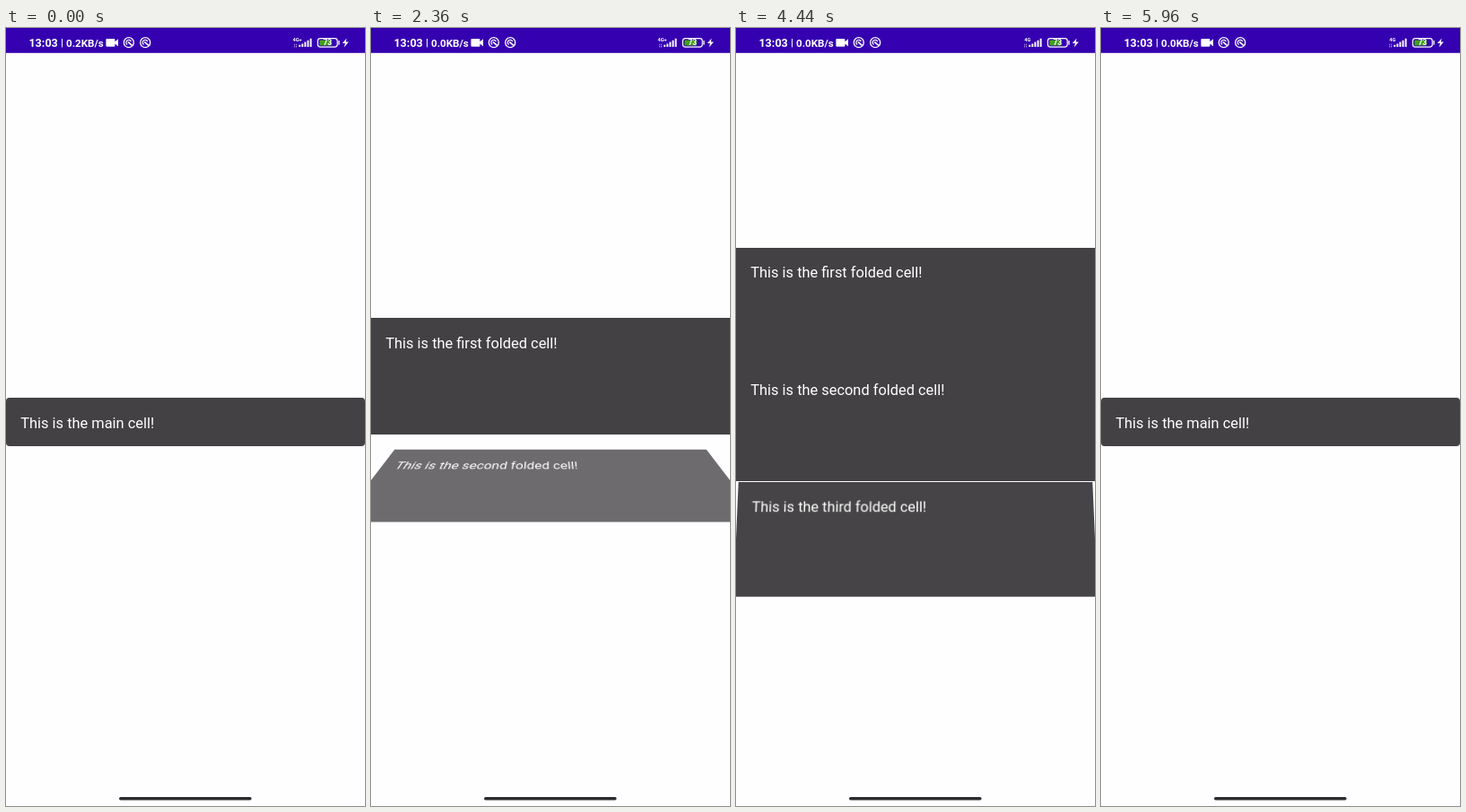
An HTML page that plays this animation: 400x867 px, repeating every 6 s.

```html
<!DOCTYPE html>
<html lang="en">
<head>
<meta charset="utf-8">
<title>Folding cells</title>
<style>
html, body { margin: 0; width: 100%; height: 100%; overflow: hidden; background: #fefdff; }
#stage { position: absolute; left: 0; top: 0; width: 400px; height: 867px; overflow: hidden; background: #fefdff; }
.cell {
  position: absolute; left: 0; width: 400px; overflow: hidden; box-sizing: border-box;
  padding: 17.8px 16.3px 0; background: #434143; color: #fff; white-space: nowrap;
  font: 16.4px/21.7px Roboto, sans-serif;
}
#main { border-radius: 4px; }
svg { position: absolute; left: 0; top: 0; }
svg text { font-family: Roboto, sans-serif; fill: #fff; }
</style>
</head>
<body>
<div id="stage">
  <div class="cell" id="main">This is the main cell!</div>
  <div class="cell fold">This is the first folded cell!</div>
  <div class="cell fold">This is the second folded cell!</div>
  <div class="cell fold">This is the third folded cell!</div>
  <svg width="400" height="867" viewBox="0 0 400 867">
    <defs>
      <g id="ring" fill="none" stroke="#fff">
        <circle r="5.5" stroke-width="1.3"/>
        <path d="M-1.6 2.4A2.9 2.9 0 1 1 2.6 -1.2" stroke-width="1.2"/>
        <path d="M-1 -.8L3.6 3.2" stroke-width="1.7"/>
      </g>
    </defs>
    <rect width="400" height="27.8" fill="#3500b0"/>
    <text x="25.4" y="20.8" font-size="12.6" font-weight="700">13:03</text>
    <text x="61" y="20.2" font-size="11.7" font-weight="500">|</text>
    <text id="speed" x="67" y="20.6" font-size="11.6" font-weight="700"></text>
    <path d="M112.4 12H120.4Q121.4 12 121.4 13V15.2L125 12.3V20.5L121.4 17.6V19.8Q121.4 20.8 120.4 20.8H112.4Q111.4 20.8 111.4 19.8V13Q111.4 12 112.4 12Z" fill="#fff"/>
    <use href="#ring" x="136.8" y="16.2"/>
    <use href="#ring" x="155.2" y="16.2"/>
    <text id="net" y="14.8" font-size="5.6" font-weight="700"></text>
    <path d="M321.6 21.5V17.8M323.6 17.8V21.5" stroke="#fff" stroke-width=".8" stroke-dasharray="1.5 .7" opacity=".75"/>
    <path d="M327.2 21V18.8M330.3 21V17.4M333.4 21V15.6M336.5 21V13.8M339.6 21V11.8" stroke="#fff" stroke-width="1.9"/>
    <rect x="347.4" y="11.7" width="21.8" height="9.4" rx="2.8" fill="none" stroke="#fff" stroke-width="1.2"/>
    <rect x="349.2" y="13.4" width="13.6" height="6" rx="1.2" fill="#43a01c"/>
    <path d="M371 14.6V18.2" stroke="#fff" stroke-width="1.3" stroke-linecap="round"/>
    <text x="358.3" y="19.4" font-size="8.4" font-weight="700" text-anchor="middle">73</text>
    <path d="M379.6 11.4L374.8 17H377.9L376.8 21.4L381.8 15.5H378.6Z" fill="#fff"/>
    <rect x="126" y="857" width="147.6" height="3.6" rx="1.8" fill="#2d2b2e"/>
  </svg>
</div>
<script>
const LOOP = 6000, FOLD_MS = 400;
const MID = 439.2, MAIN_H = 54.3, CELL_H = 130.4, PAD = 17.8, CAMERA = 213;
const OPEN = [1747, 2159, 2559];
const CLOSE = [5210, 4810, 4410];

const $ = id => document.getElementById(id);
const main = $('main'), speed = $('speed'), net = $('net');
const folds = [...document.querySelectorAll('.fold')];

// cubic-bezier(.4, 0, .2, 1)
function ease(x) {
  if (x <= 0) return 0;
  if (x >= 1) return 1;
  let lo = 0, hi = 1;
  for (let i = 0; i < 24; i++) {
    const s = (lo + hi) / 2, r = 1 - s;
    if (1.2 * r * r * s + .6 * r * s * s + s * s * s < x) lo = s; else hi = s;
  }
  return lo * lo * (3 - 2 * lo);
}

const openness = (t, i) => ease((t - OPEN[i]) / FOLD_MS) - ease((t - CLOSE[i]) / FOLD_MS);

function place(el, top, height, alpha) {
  el.style.top = top + 'px';
  el.style.height = height + 'px';
  el.style.opacity = alpha;
  el.style.visibility = alpha > .001 ? 'visible' : 'hidden';
}

function draw(t) {
  const open = folds.map((_, i) => openness(t, i));
  const total = Math.max(MAIN_H, CELL_H * open.reduce((a, b) => a + b));
  let y = MID - total / 2;

  place(main, y, total, 1 - open[0]);
  folds.forEach((el, i) => {
    const p = open[i], h = CELL_H * p;
    place(el, y, h, p);
    // Padding must not hold a short cell open.
    el.style.paddingTop = Math.min(PAD, h) + 'px';
    el.style.transform = p < 1 ? `perspective(${CAMERA}px) rotateX(${180 * (1 - p)}deg)` : 'none';
    y += h;
  });

  speed.textContent = t < 1000 ? '0.2KB/s' : '0.0KB/s';
  const plus = t < 3720;
  net.textContent = plus ? '4G+' : '4G';
  net.setAttribute('x', plus ? 319.6 : 321.2);
}

const start = performance.now();
function tick() {
  draw((performance.now() - start) % LOOP);
  requestAnimationFrame(tick);
}
draw(0);
requestAnimationFrame(tick);
</script>
</body>
</html>
```
